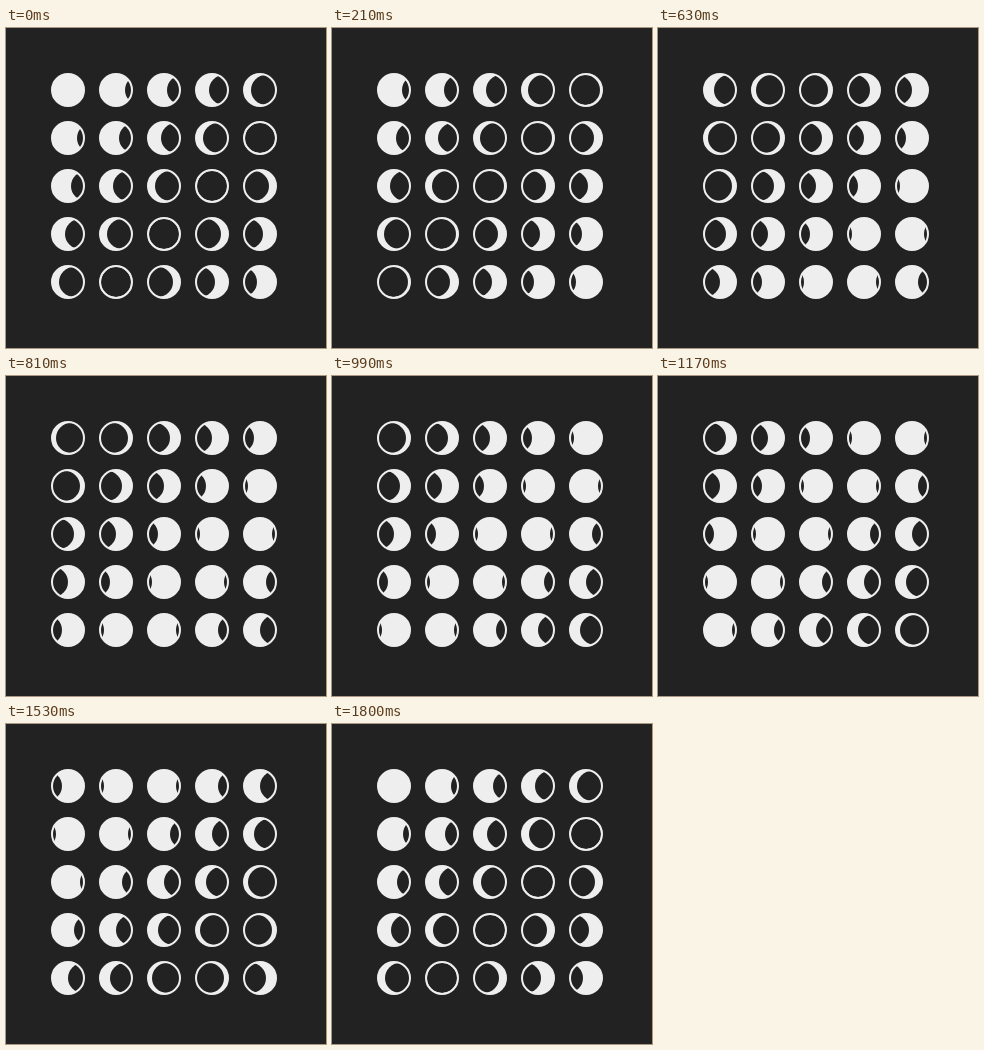
These frames come from a looping animation (320 by 320 pixels, 1830 ms). An HTML page with a canvas:

```html
<!DOCTYPE html>
<html lang="en">
<head>
<meta charset="utf-8">
<title>Moon phases</title>
<style>
  html, body { margin: 0; width: 100%; height: 100%; overflow: hidden; background: #222; }
  canvas { display: block; }
</style>
</head>
<body>
<canvas id="stage" width="320" height="320"></canvas>
<script>
const ctx = document.getElementById('stage').getContext('2d');
const DARK = '#222', LIGHT = '#eee';
const COUNT = 5, GAP = 48, FIRST = 62;
const RADIUS = 15, RING = 2;
const STEP = 30, CYCLE = 60, LOOP = 1830;

function circle(x, y, r) {
  ctx.beginPath();
  ctx.arc(x, y, r, 0, Math.PI * 2);
}

// phase 0..1: the shadow crosses the moon from right to left
function moon(x, y, phase) {
  const mid = RADIUS + RING / 2;
  circle(x, y, mid);
  ctx.fillStyle = LIGHT;
  ctx.fill();

  ctx.save();
  ctx.clip();
  circle(x + 2 * RADIUS * (1 - 2 * phase), y, RADIUS);
  ctx.fillStyle = DARK;
  ctx.fill();
  ctx.restore();

  circle(x, y, mid);
  ctx.lineWidth = RING;
  ctx.strokeStyle = LIGHT;
  ctx.stroke();
}

function draw(ms) {
  const step = Math.floor((ms % LOOP) / STEP);
  ctx.fillStyle = DARK;
  ctx.fillRect(0, 0, 320, 320);
  for (let row = 0; row < COUNT; row++) {
    for (let col = 0; col < COUNT; col++) {
      const phase = ((step + 6 * (row + col)) % CYCLE) / CYCLE;
      moon(FIRST + col * GAP, FIRST + row * GAP, phase);
    }
  }
}

let start;
function tick(now) {
  if (start === undefined) start = now;
  draw(now - start);
  requestAnimationFrame(tick);
}
draw(0);
requestAnimationFrame(tick);
</script>
</body>
</html>
```
